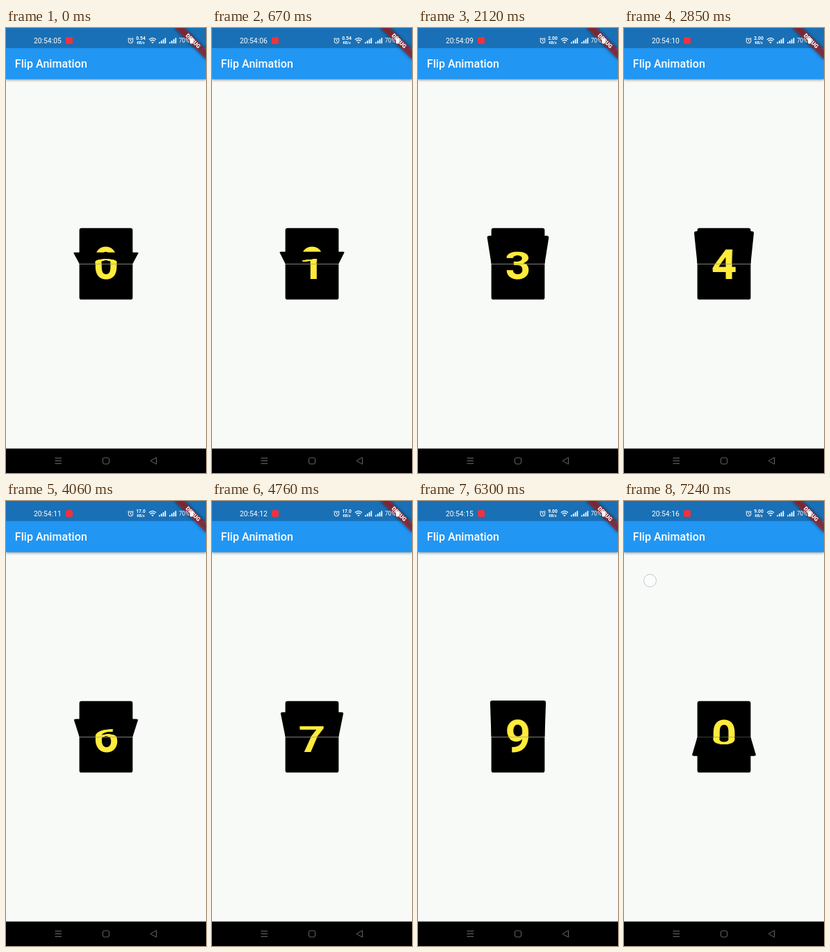
Animation of 288 by 640 pixels, one loop 7.27 s. Source, as an HTML page:

```html
<!DOCTYPE html>
<html lang="en">
<head>
<meta charset="utf-8">
<title>Flip Animation</title>
<style>
html, body { margin: 0; width: 100%; height: 100%; overflow: hidden; background: #f8faf7; }
#stage { position: relative; width: 288px; height: 640px; overflow: hidden; background: #f8faf7;
  font-family: Roboto, sans-serif; color: #fff; }
#stage div { position: absolute; }
#shadow { left: 0; top: 0; width: 288px; height: 73px; box-shadow: 0 2px 3.5px rgba(0, 0, 0, .38); }
#title { left: 12.8px; top: 42px; font: 500 16px/20px Roboto, sans-serif; letter-spacing: .06px; white-space: nowrap; }
#clock { left: 40px; top: 13px; font-size: 10.3px; line-height: 12px; }
#rec { left: 86px; top: 13px; width: 10px; height: 10px; border-radius: 2.5px; background: #f0323f; }
#rate, #unit { left: 184px; width: 20px; text-align: center; font-weight: 700; }
#rate { top: 12px; font-size: 6.8px; line-height: 7px; }
#unit { top: 18px; font-size: 5.2px; line-height: 6px; }
#level { left: 249px; top: 13px; font-size: 8.2px; line-height: 10px; }
#stage svg { position: absolute; left: 0; top: 0; }
#banner { left: 288px; top: 0; width: 0; height: 0; transform: rotate(45deg); }
#banner div { left: -32px; top: 22.4px; width: 64px; height: 9.6px; }
#banner .shade { background: rgba(0, 0, 0, .5); filter: blur(2.6px); }
#banner .label { background: rgba(183, 28, 28, .63); text-align: center;
  font: 900 8.16px/9.6px Roboto, sans-serif; }
/* The card is laid out in device-independent units, 0.8 stage pixels each. */
#card { left: 0; top: 0; width: 96px; height: 129px; transform-origin: 0 0;
  transform: translate(105.6px, 287.8px) scale(.8); }
.half { left: 0; top: 0; width: 96px; height: 64px; background: #000; overflow: hidden; }
.half div { left: 0; width: 96px; height: 128px; text-align: center;
  font: 700 80px/128px Roboto, sans-serif; color: #ffeb3b; }
.up { border-radius: 4px 4px 0 0; transform-origin: 50% 100%; }
.up div { top: 0; }
.down { border-radius: 0 0 4px 4px; transform-origin: 50% 0; transform: translateY(64.5px); }
.down div { top: -64px; }
#touch { left: 28px; top: 105px; width: 17px; height: 17px; border: 1px solid #c3c5d6;
  border-radius: 50%; background: rgba(255, 255, 255, .5); }
</style>
</head>
<body>
<div id="stage">
  <div id="shadow"></div>
  <svg width="288" height="640">
    <rect width="288" height="73.6" fill="#2196f3"/>
    <rect width="288" height="28.8" fill="#1970b6"/>
    <rect y="604.8" width="288" height="36"/>
  </svg>
  <div id="title">Flip Animation</div>
  <div id="banner"><div class="shade"></div><div class="label">DEBUG</div></div>
  <div id="clock"></div>
  <div id="rec"></div>
  <div id="rate"></div>
  <div id="unit">KB/s</div>
  <div id="level">70%</div>
  <svg width="288" height="640" fill="none" stroke="#fff">
    <g stroke-width="1">
      <circle cx="179.5" cy="18.5" r="3.4"/>
      <path d="M179.5 16.5v2.3l1.5 1M175.3 15.8l2-1.8M183.7 15.8l-2-1.8"/>
      <path d="M206 16.7q5-4.6 10 0M207.7 18.8q3.3-3 6.6 0" stroke-width="1.3"/>
      <path d="M209.3 20.4q1.7-1.4 3.4 0L211 22.3z" fill="#fff" stroke="none"/>
    </g>
    <path id="bars" stroke-width="1.7"/>
    <rect x="265" y="14.5" width="4.6" height="8" rx="1" fill="#fff" stroke="none"/>
    <g stroke="#666" stroke-width="1">
      <path d="M70.5 618.5h9.5M70.5 622.5h9.5M70.5 626.5h9.5"/>
      <rect x="139.5" y="618" width="9" height="9" rx="2"/>
      <path d="M208 622.5l8.5-4.8v9.6z" stroke-linejoin="round"/>
    </g>
  </svg>
  <div id="card">
    <div id="upper" class="half up"><div></div></div>
    <div id="lower" class="half down"><div></div></div>
    <div id="upperFlap" class="half up"><div></div></div>
    <div id="lowerFlap" class="half down"><div></div></div>
  </div>
  <div id="touch"></div>
</div>
<script>
const LOOP = 7270;
const SECOND = 672;      // one clock second in loop time
const CLOCK_START = 5.88;
const TOUCH_AT = 6900;

// [time, half-turns]: each flip takes two half-turns, with slight timer jitter
const TURNS = [[0, 1.163], [1390, 5.333], [2850, 9.6], [4060, 13.267],
  [5480, 17.578], [6300, 19.844], [7240, 22.706], [7270, 22.8]];
const RATES = [[0, '0.54'], [1300, '2.00'], [3450, '17.0'], [5650, '9.00']];

const $ = id => document.getElementById(id);

function turnsAt(t) {
  const i = Math.max(1, TURNS.findIndex(([time]) => t < time));
  const [t0, a] = TURNS[i - 1], [t1, b] = TURNS[i];
  return a + (b - a) * (t - t0) / (t1 - t0);
}

function setText(el, text) {
  if (el.textContent !== text) el.textContent = text;
}

const setDigit = (id, n) => setText($(id).firstChild, String(n % 10));

function setFlap(id, y, angle, visible) {
  const style = $(id).style;
  style.visibility = visible ? 'visible' : 'hidden';
  style.transform = `translateY(${y}px) perspective(333.33px) rotateX(${angle}deg)`;
}

function draw(t) {
  const turns = turnsAt(t);
  const next = Math.floor(turns / 2), current = next + 9;
  const phase = turns - next * 2;

  setDigit('upper', current);
  setDigit('lower', next);
  setDigit('lowerFlap', current);
  setDigit('upperFlap', next);
  setFlap('lowerFlap', 64.5, 90 * phase, phase < 1);
  setFlap('upperFlap', 0, -90 * (2 - phase), phase >= 1);

  const sec = Math.floor(CLOCK_START + t / SECOND);
  setText($('clock'), '20:54:' + String(sec).padStart(2, '0'));
  setText($('rate'), RATES.filter(([time]) => time <= t).pop()[1]);
  $('touch').style.visibility = t >= TOUCH_AT ? 'visible' : 'hidden';
}

$('bars').setAttribute('d', [221, 236].map(x =>
  [2, 4, 6, 8].map((h, i) => `M${x + i * 2.8} 22.3v${-h}`).join('')).join(''));

const start = performance.now();
function tick() {
  draw((performance.now() - start) % LOOP);
  requestAnimationFrame(tick);
}
tick();
</script>
</body>
</html>
```
